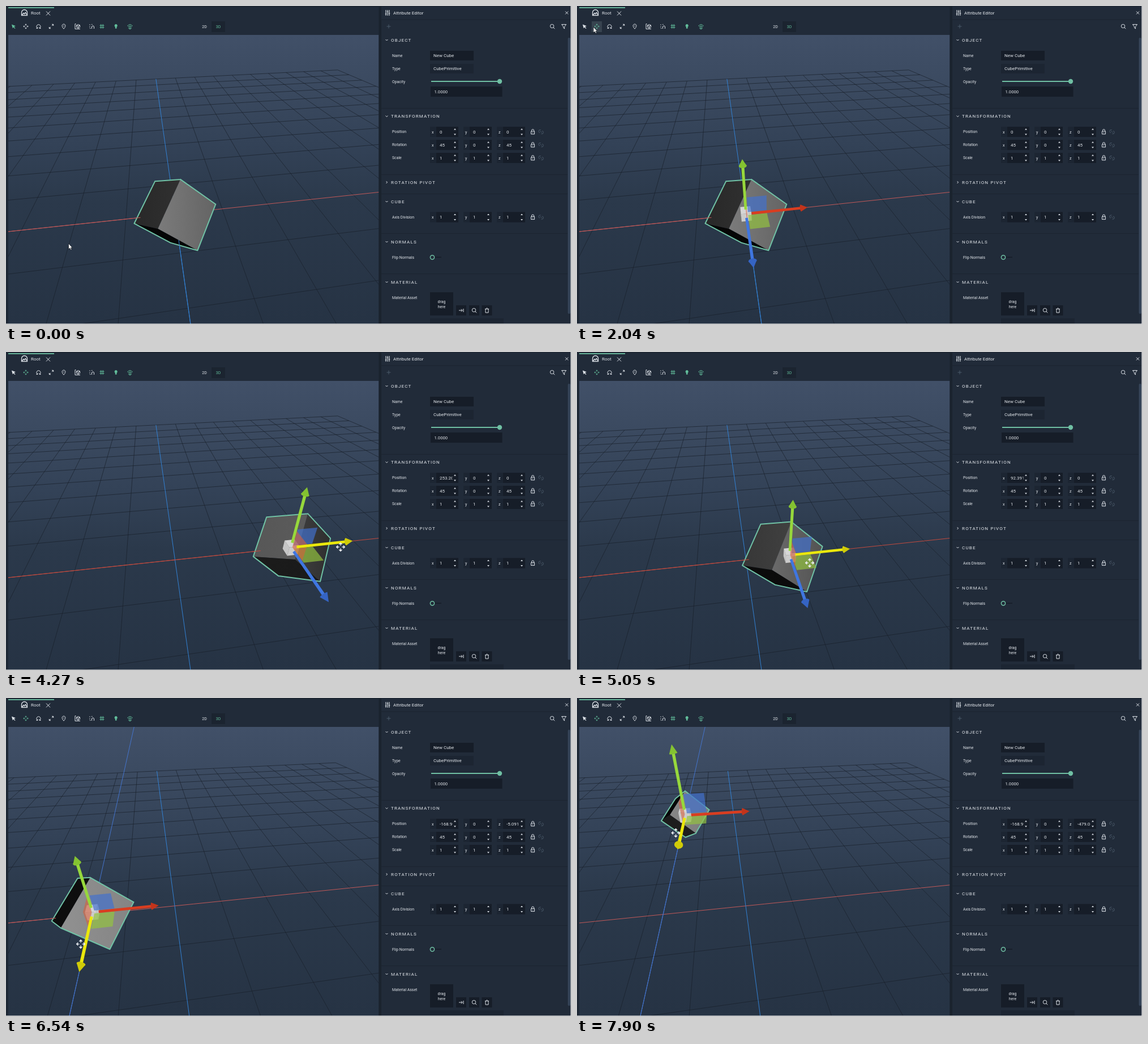
An HTML page with a canvas that plays this animation: 998 px wide and 561 px high, repeating every 8000 ms.

```html
<!DOCTYPE html>
<html lang="en">
<head>
<meta charset="utf-8">
<title>Attribute Editor</title>
<style>
html, body { margin: 0; width: 100%; height: 100%; overflow: hidden; background: #1b2430; }
canvas, svg { position: absolute; left: 0; top: 0; width: 998px; height: 561px; display: block; }
svg svg { position: static; width: auto; height: auto; }
text { font-family: Roboto, "Open Sans", sans-serif; fill: #e3e7ec; white-space: pre; }
.ic { fill: none; stroke: #dde2e8; stroke-width: 1; }
.green { stroke: #62bd9b; }
.dim { stroke: #4b5a6a; }
</style>
</head>
<body>
<canvas id="view" width="998" height="561"></canvas>
<svg id="ui" viewBox="0 0 998 561" xmlns="http://www.w3.org/2000/svg"></svg>
<script>
const ctx = document.getElementById('view').getContext('2d');
const ui = document.getElementById('ui');
const LOOP = 8000;

/* ---------- interface ---------- */
const PANEL = '#212b39', DARK = '#161d28', MID = '#1c2532';
const rect = (x, y, w, h, fill, extra = '') => `<rect x="${x}" y="${y}" width="${w}" height="${h}" fill="${fill}" ${extra}/>`;
const text = (x, y, s, size = 6.9, extra = '') => `<text x="${x}" y="${y + size * .36}" font-size="${size}" ${extra}>${s}</text>`;
const icon = (x, y, d, cls = '', extra = '') => `<path class="ic ${cls}" transform="translate(${x} ${y})" d="${d}" ${extra}/>`;
const CROSS = 'M-3.5-3.5 3.5 3.5M3.5-3.5-3.5 3.5';
const MOVE = 'M0-4V-1.5M0 4V1.5M-4 0H-1.5M4 0H1.5M-1.3-2.8 0-4.2 1.3-2.8M-1.3 2.8 0 4.2 1.3 2.8M-2.8-1.3-4.2 0-2.8 1.3M2.8-1.3 4.2 0 2.8 1.3';
const LENS = 'M2.7-.5A3.2 3.2 0 1 1-3.7-.5 3.2 3.2 0 1 1 2.7-.5M1.9 1.9 4.3 4.3';
const ARROW = 'M0 0V10L2.3 8 4 11.3 5.6 10.5 4 7.4H6.8Z';
const GRAB = 'M0-7V-2.5M0 7V2.5M-7 0H-2.5M7 0H2.5M-2.5-4.7 0-7.3 2.5-4.7M-2.5 4.7 0 7.3 2.5 4.7M-4.7-2.5-7.3 0-4.7 2.5M4.7-2.5 7.3 0 4.7 2.5';

function section(y, title, open = true) {
  return icon(672.5, y, open ? 'M-2-1 0 1 2-1' : 'M-1-2 1 0-1 2') + text(680, y, title, 8, 'letter-spacing="1.2"');
}

function vector(y, label, values, ids = []) {
  let s = text(682, y, label);
  values.forEach((v, i) => {
    const x = 749 + 59 * i;
    s += rect(x, y - 9, 50, 18, MID) + rect(x + 11, y - 9, 39, 18, DARK);
    s += text(x + 3, y, 'xyz'[i], 7);
    s += text(x + 17, y, v, 8, `clip-path="url(#col${i})"` + (ids[i] ? ` id="${ids[i]}"` : ''));
    s += `<path fill="#dde2e8" d="M${x + 42} ${y - 3.6}l2-2.4 2 2.4zM${x + 42} ${y + 3.6}l2 2.4 2-2.4z"/>`;
  });
  s += icon(930.5, y, 'M-3-1H3V4H-3ZM-2-1V-2.5A2 2 0 0 1 2-2.5V-1M0 1V2.2');
  return s + icon(945, y, 'M-.5-3.5H-2A2 2 0 0 0-4-1.5V-.5A2 2 0 0 0-2 1.5M.5 3.5H2A2 2 0 0 0 4 1.5V.5A2 2 0 0 0 2-1.5M-1.5-1.5 1.5 1.5', 'dim');
}

const button = (x, d) => rect(x - 9, 528, 18, 18, DARK) + icon(x, 537, d);

ui.innerHTML = [
  // number fields cut their text off before the spinner
  [0, 1, 2].map(i => `<clipPath id="col${i}">${rect(760 + 59 * i, 200, 28.5, 200, '#000')}</clipPath>`).join(''),
  // frame around the viewport
  rect(0, 0, 998, 2, '#1b2430'), rect(4, 2, 655, 49, PANEL), rect(4, 2, 81, 1.8, '#6fc3a5'),
  rect(0, 0, 4, 561, '#1e2835'), rect(658.5, 0, 4.5, 561, '#1a232e'),
  // tab
  icon(32.5, 12, 'M-5 4.5V-.5A5 5 0 0 1 5-.5V4.5ZM-4 3.5-1.5 .5 0 2 2-.5 4 3', '', 'style="stroke-width:1.3"'),
  text(44, 12.5, 'Root', 8), icon(74.5, 13, CROSS),
  // tools
  '<rect id="hover" x="26" y="27" width="18" height="19" fill="#37434f"/>',
  '<path id="select" transform="translate(10 32.5)" d="M0 0 7 2.8 4.2 4 6.5 6.7 5.5 7.6 3.2 5 1.8 7Z"/>',
  icon(35, 36, MOVE, '', 'id="move"'),
  icon(57.5, 36, 'M-2 3.4A3.6 3.6 0 1 1 2 3.4M-4 3.5H-1.6V1.2M4 3.5H1.6V1.2'),
  icon(80, 36, 'M-3.5 3.5-1 1M3.5-3.5 1-1M-3.7 1V3.7H-1M1-3.7H3.7V-1'),
  icon(102, 36, 'M0 4.3C-5-1-2.6-4 0-4S5-1 0 4.3M-.8-.8H.8'),
  icon(126.5, 36, 'M-4.5-4.5V4.5H4.5M-4.5-4.5H-3M-2-2 1-3.5 4-2V1.5L1 3-2 1.5ZM-2-2 1-.5 4-2M1-.5V3'),
  icon(151.5, 36, 'M0 4V1A2 2 0 0 1 4 1V4M-3.5-3.5V-2M-.5-3.5H1M-3.5 0V1.5M-3.5 3.5H-2'),
  icon(169.5, 36, 'M-1.7-4V4M1.7-4V4M-4-1.7H4M-4 1.7H4', 'green'),
  '<path fill="#62bd9b" d="M194.2 32a2.7 2.7 0 0 1 1.3 5v2.8h-2.6v-2.8a2.7 2.7 0 0 1 1.3-5z"/>',
  icon(219, 36, 'M-4.2-1C-2-4 2-4 4.2-1 2 1.5-2 1.5-4.2-1ZM-1-1H1M-3 3H3M-1.5 4.5H1.5', 'green'),
  text(350.5, 36.2, '2D', 7, 'text-anchor="middle"'),
  rect(363, 27, 24, 19, '#1b2430'),
  text(375, 36.2, '3D', 7, 'text-anchor="middle" style="fill:#62bd9b"'),
  // attribute panel
  rect(663, 1, 335, 560, PANEL), rect(663, 23.5, 335, 1, '#1c2531'),
  icon(674, 12, 'M-3-5V5M0-5V5M3-5V5M-4.3 2H-1.7M-1.3-2H1.3M1.7 1H4.3', '', 'style="stroke-width:1.1"'),
  text(684, 12.3, 'Attribute Editor', 8), icon(990.5, 12, 'M-2.5-2.5 2.5 2.5M2.5-2.5-2.5 2.5'),
  icon(676, 36, 'M-3.5 0H3.5M0-3.5V3.5', 'dim'), icon(965, 36, LENS), icon(985.5, 36, 'M-4-3.5H4L1 .5V4L-1 2.5V.5Z'),
  rect(992.5, 56, 4.5, 487, '#354458', 'rx="2"'),
  [180, 297, 331, 401, 472].map(y => rect(663, y, 329, 1, '#1b2430')).join(''),

  section(60, 'OBJECT'),
  text(682, 87.5, 'Name'), rect(749, 79, 77, 17, DARK), text(755, 87.5, 'New Cube', 8),
  text(682, 110.5, 'Type'), rect(749, 102, 77, 17, MID), text(755, 110.5, 'CubePrimitive', 8),
  text(682, 133.3, 'Opacity'), rect(751, 132, 121, 2, '#6fbfa3'), '<circle cx="872" cy="133" r="4.2" fill="#6fbfa3"/>',
  rect(750, 142, 126.5, 18, DARK), text(756.5, 151.3, '1.0000', 7.7),

  section(194.5, 'TRANSFORMATION'),
  vector(222, 'Position', [0, 0, 0], ['px', '', 'pz']),
  vector(245, 'Rotation', [45, 0, 45]), vector(268, 'Scale', [1, 1, 1]),
  section(311, 'ROTATION PIVOT', false),
  section(345, 'CUBE'), vector(372.5, 'Axis Division', [1, 1, 1]),
  section(416, 'NORMALS'), text(682, 443.5, 'Flip Normals'), rect(757, 442.5, 12, 1.5, DARK),
  '<circle cx="753" cy="443.3" r="3.6" fill="none" stroke="#6fbfa3" stroke-width="1.5"/>',
  section(487, 'MATERIAL'), text(682, 514.5, 'Material Asset'),
  rect(749, 505, 41, 41, DARK),
  text(769.5, 521.5, 'drag', 7, 'text-anchor="middle"'), text(769.5, 530.5, 'here', 7, 'text-anchor="middle"'),
  button(804, 'M-4 0H2M0-2.3 2.3 0 0 2.3M4-3V3'), button(827, LENS),
  button(849.5, 'M-2.5-2V4H2.5V-2M-3.5-2.5H3.5M-1-4H1'),
  rect(749, 551, 130, 10, MID),
  // pale outer edge
  rect(0, 560.4, 998, .6, '#fff'), rect(997.4, 0, .6, 561, '#fff'),
  // pointers
  `<path id="arrow" d="${ARROW}" fill="#fff" stroke="#10161e" stroke-width=".7"/>`,
  `<path id="grab" d="${GRAB}" fill="none" stroke="#eef1f5" stroke-width="1.4"/>`
].join('');
const $ = id => document.getElementById(id);

/* ---------- camera ---------- */
const dot = (a, b) => a[0] * b[0] + a[1] * b[1] + a[2] * b[2];
const cross = (a, b) => [a[1] * b[2] - a[2] * b[1], a[2] * b[0] - a[0] * b[2], a[0] * b[1] - a[1] * b[0]];
const add = (a, b, k = 1) => a.map((v, i) => v + b[i] * k);
const FOCAL = 471, CX = 331, CY = 305, UNIT = .00181;

function camera(X, Z, T) {
  const ray = c => [(c[0] - CX * c[2]) / FOCAL, (c[1] - CY * c[2]) / FOCAL, c[2]];
  const x = ray(X), z = ray(Z), t = ray(T), y = cross(z, x).map(v => v / UNIT);
  const Y = [FOCAL * y[0] + CX * y[2], FOCAL * y[1] + CY * y[2], y[2]];
  return { X, Y, Z, T, eye: [x, y, z].map(r => -dot(r, t) / (UNIT * UNIT)) };
}
const cams = [
  camera([.91, -.017, .0002], [-.3557, .0485, -.00147], [298.5, 366.7, 1]),
  camera([.893, -.014, .000195], [-.3602, .0485, -.00147], [298, 366.8, 1])
];
let cam = cams[0];

const raw = p => cam.T.map((v, i) => v + cam.X[i] * p[0] + cam.Y[i] * p[1] + cam.Z[i] * p[2]);
const project = p => { const [u, v, w] = raw(p); return [u / w, v / w, w]; };

function line(a, b, color) {
  const wa = raw(a)[2], wb = raw(b)[2], near = .06;
  if (wa < near && wb < near) return;
  const cut = add(a, add(b, a, -1), (near - wa) / (wb - wa));
  const p = project(wa < near ? cut : a), q = project(wb < near ? cut : b);
  ctx.strokeStyle = color;
  ctx.lineWidth = 1;
  ctx.beginPath();
  ctx.moveTo(p[0], p[1]);
  ctx.lineTo(q[0], q[1]);
  ctx.stroke();
}

function poly(points, fill) {
  ctx.beginPath();
  points.forEach(p => ctx.lineTo(p[0], p[1]));
  ctx.closePath();
  ctx.fillStyle = fill;
  ctx.fill();
}

/* ---------- cube ---------- */
const H = Math.SQRT1_2;
const TILTED = [[H, -H, 0], [.5, .5, H], [-.5, -.5, H]];
const STRAIGHT = [[1, 0, 0], [0, 1, 0], [0, 0, 1]];

function boxFaces(pos, basis, half) {
  const faces = [];
  basis.forEach((n, i) => [1, -1].forEach(s => {
    const normal = n.map(v => v * s);
    const centre = add(pos, normal, half);
    if (dot(normal, add(cam.eye, centre, -1)) <= 0) return;
    const corners = [[1, 1], [1, -1], [-1, -1], [-1, 1]].map(([a, b]) => {
      const p = add(add(centre, basis[(i + 1) % 3], a * half), basis[(i + 2) % 3], b * half);
      return { p, q: project(p) };
    });
    faces.push({ normal, corners });
  }));
  return faces;
}

function shade(p, normal) {
  const d = add(cam.eye, p, -1);
  const c = Math.max(0, dot(d, normal) / Math.hypot(...d));
  const v = Math.round(150 * c ** 1.45);
  return `rgb(${v},${v},${v})`;
}

function drawCube(pos) {
  const edges = new Map();
  for (const { normal, corners } of boxFaces(pos, TILTED, 50)) {
    const sorted = [...corners].sort((a, b) => a.q[0] - b.q[0]);
    const l = sorted[0], r = sorted[3];
    const g = ctx.createLinearGradient(l.q[0], 0, r.q[0], 0);
    g.addColorStop(0, shade(l.p, normal));
    g.addColorStop(1, shade(r.p, normal));
    poly(corners.map(c => c.q), g);
    // an edge met only once belongs to the silhouette
    corners.forEach((c, i) => {
      const d = corners[(i + 1) % 4];
      const key = [c, d].map(k => k.p.map(v => Math.round(v)).join()).sort().join('|');
      edges.has(key) ? edges.delete(key) : edges.set(key, [c.q, d.q]);
    });
  }
  ctx.strokeStyle = '#70c2a5';
  ctx.lineWidth = 2;
  ctx.lineCap = 'round';
  ctx.beginPath();
  for (const [a, b] of edges.values()) { ctx.moveTo(a[0], a[1]); ctx.lineTo(b[0], b[1]); }
  ctx.stroke();
  ctx.lineCap = 'butt';
}

/* ---------- gizmo ---------- */
const RED = ['#d93d20', '#c2341b'], GREEN = ['#97d83c', '#84c231'];
const BLUE = ['#3f76e0', '#3564c4'], YELLOW = ['#ebe80c', '#d0cb08'];

function drawArrow(pos, axis, len, [body, head]) {
  const a = project(add(pos, axis, len * .09));
  const b = project(add(pos, axis, len * .89));
  const tip = project(add(pos, axis, len));
  const dx = tip[0] - b[0], dy = tip[1] - b[1], d = Math.hypot(dx, dy);
  const nx = -dy / d, ny = dx / d;
  const side = (p, r) => [p[0] + nx * r, p[1] + ny * r];
  const ra = len * .0175 / a[2], rb = len * .0175 / b[2], r = len * .047 / b[2];
  poly([side(a, ra), side(b, rb), side(b, -rb), side(a, -ra)], body);
  const flat = Math.min(1, d / (len * .095 / b[2]));
  ctx.beginPath();
  ctx.ellipse(b[0], b[1], r * Math.max(.2, Math.sqrt(1 - flat * flat)), r, Math.atan2(dy, dx), 0, 7);
  ctx.fillStyle = head;
  ctx.fill();
  poly([side(b, r), tip, side(b, -r)], head);
}

function drawGizmo(pos, active) {
  const len = 132 * Math.hypot(...add(cam.eye, pos, -1)) / 569;
  const quad = (i, j, color) => {
    const k = len * .33, o = len * .03;
    poly([[o, o], [k, o], [k, k], [o, k]].map(([a, b]) =>
      project(add(add(pos, STRAIGHT[i], a), STRAIGHT[j], b))), color);
  };
  boxFaces(pos, STRAIGHT, len * .08).forEach((f, i) =>
    poly(f.corners.map(c => c.q), ['#c6c6c6', '#d6d6d6', '#cccccc'][i % 3]));
  quad(0, 1, 'rgba(66,112,206,.68)');
  quad(0, 2, 'rgba(148,196,62,.68)');
  quad(1, 2, 'rgba(214,96,62,.6)');
  [RED, GREEN, BLUE].forEach((c, i) => drawArrow(pos, STRAIGHT[i], len, i === active ? YELLOW : c));
}

/* ---------- timeline ---------- */
const runs = [[430, 430, 1], [700, 1630, 8], [2040, 2040, 1], [2440, 3430, 8], [3580, 4540, 8],
  [4660, 5570, 8], [5720, 6680, 8], [6830, 6830, 1], [6950, 7740, 6], [7900, 7900, 1]];
const ticks = [0];
for (const [from, to, n] of runs)
  for (let i = 0; i < n; i++) ticks.push(n < 2 ? from : Math.round(from + (to - from) * i / (n - 1)));

const pointer = [[0, 110.5, 419], [430, 107.5, 428], [700, 107, 427], [1000, 96, 345], [1400, 48, 112],
  [1630, 29, 37], [2300, 29, 37], [2440, 36, 46], [3000, 225, 250], [3430, 367, 362], [3580, 384, 367],
  [3700, 402, 365], [4266, 591, 344], [4400, 604, 341], [4660, 562, 349], [5050, 411, 372],
  [5570, 244, 393], [5720, 235, 394], [6350, 132, 437], [6680, 132, 420], [6830, 138, 388],
  [6950, 146, 336], [7420, 178, 226], [7740, 172, 246], [7900, 174.5, 238]];
const trackX = [[3580, 0], [3700, 18], [4266, 253.205], [4400, 262], [4660, 235], [5050, 92.391],
  [5570, -158.584], [5720, -168.992]];
const trackZ = [[6350, 0], [6680, -30], [6830, -75], [6950, -157.772], [7420, -530], [7740, -440], [7900, -479.052]];

function at(track, t, col = 1) {
  if (t <= track[0][0]) return track[0][col];
  for (let i = 1; i < track.length; i++) {
    const a = track[i - 1], b = track[i];
    if (t <= b[0]) return a[col] + (b[col] - a[col]) * (t - a[0]) / (b[0] - a[0]);
  }
  return track[track.length - 1][col];
}

function drawView(t) {
  cam = cams[t < 5860 ? 0 : 1];
  // the cube runs a little ahead of the gizmo, the gizmo ahead of the z number
  const pos = [at(trackX, t + 32), 0, at(trackZ, t + 32)];
  const hub = [at(trackX, t), 0, at(trackZ, t + 12)];
  const dragX = t >= 3570 && t < 5720, dragZ = t >= 6300;

  ctx.clearRect(0, 0, 998, 561);
  ctx.save();
  ctx.beginPath();
  ctx.rect(4, 51, 654.5, 509.4);
  ctx.clip();
  const sky = ctx.createLinearGradient(0, 51, 0, 560);
  [[0, '#415068'], [.2, '#3a495f'], [.38, '#334257'], [.58, '#2b394b'], [1, '#263344']].forEach(s => sky.addColorStop(...s));
  ctx.fillStyle = sky;
  ctx.fillRect(4, 51, 655, 510);

  const ink = 'rgba(24,31,42,.68)';
  for (let i = -10; i <= 10; i++) {
    const k = i * 100;
    if (!i) continue;
    line([k, 0, -1000], [k, 0, 1000], ink);
    line([-1000, 0, k], [1000, 0, k], ink);
  }
  const red = dragX ? '#c24a3e' : '#c05858', blue = '#3280d2', guide = '#4474cc';
  line([-1000, 0, 0], [dragX ? 3000 : 1000, 0, 0], red);
  line([0, 0, -1000], [0, 0, 1000], blue);
  if (dragZ) line([hub[0], 0, -2700], [hub[0], 0, 1000], guide);

  drawCube(pos);
  // axis parts in front of the cube
  if (Math.abs(pos[2]) < 50) line([-1000, 0, 0], [pos[0] - 70.7, 0, 0], red);
  const off = Math.abs(pos[0]);
  if (off < 70) line([0, 0, pos[2] + (50 - off / 2) / H], [0, 0, 1000], blue);
  if (dragZ) line([hub[0], 0, pos[2] + 70.7], [hub[0], 0, 1000], guide);
  if (t >= 2040) drawGizmo(hub, dragX ? 0 : dragZ ? 2 : -1);
  ctx.restore();
}

const show = v => v ? v.toFixed(3) : '0';

function frame(now) {
  const time = now % LOOP;
  const t = ticks.filter(k => k <= time + .5).pop();
  drawView(t);

  const moving = t >= 2040;
  $('px').textContent = show(at(trackX, t));
  $('pz').textContent = show(at(trackZ, t));
  $('hover').style.display = t >= 1620 && t < 2440 ? '' : 'none';
  $('select').style.fill = moving ? '#dde2e8' : '#62bd9b';
  $('move').style.stroke = moving ? '#62bd9b' : '#dde2e8';

  const grab = t >= 3570;
  const spot = `translate(${at(pointer, t)} ${at(pointer, t, 2)})`;
  $('arrow').style.display = grab ? 'none' : '';
  $('grab').style.display = grab ? '' : 'none';
  $(grab ? 'grab' : 'arrow').setAttribute('transform', spot);
  requestAnimationFrame(frame);
}
requestAnimationFrame(frame);
</script>
</body>
</html>
```
